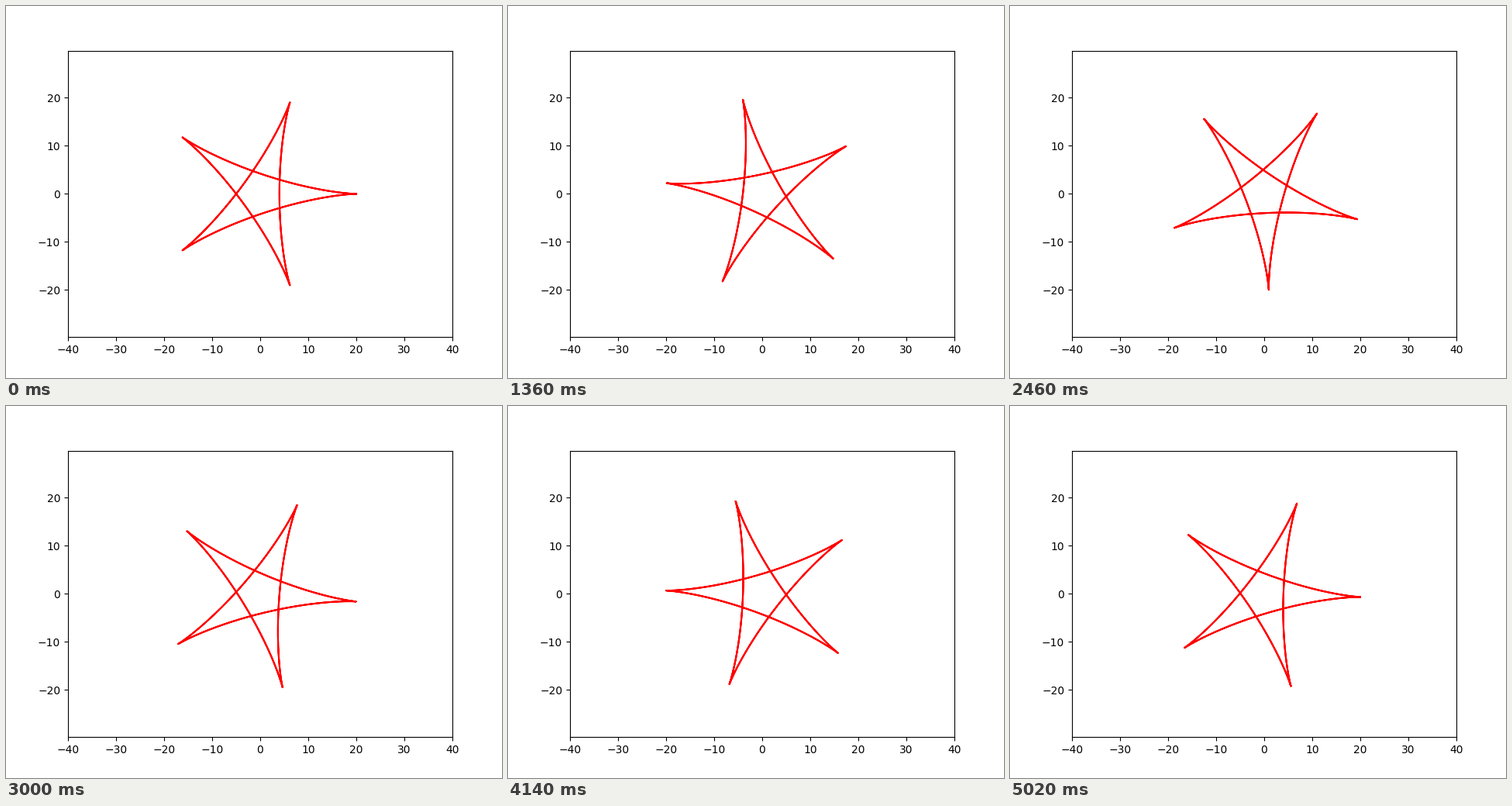
A matplotlib script that plays this animation: 640 by 480 pixels, repeating every 5040 ms.

```python
import numpy as np
import matplotlib.pyplot as plt
from matplotlib.animation import FuncAnimation

FRAMES = 252
INTERVAL = 20      # ms
STEP = 0.1         # radians turned per frame
R, r = 20, 8       # fixed and rolling circle

# Five-cusped hypocycloid, traced around twice
t = np.linspace(0, 8 * np.pi, 2001)
k = (R - r) / r
star = (R - r) * np.exp(1j * t) + r * np.exp(-1j * k * t)

fig, ax = plt.subplots(figsize=(6.4, 4.8), dpi=100)
half = 40
box = ax.get_position()
ratio = (box.height * 4.8) / (box.width * 6.4)
ax.set_xlim(-half, half)
ax.set_ylim(-half * ratio, half * ratio)   # equal units on both axes
line, = ax.plot([], [], color="red", lw=1.5)


def update(i):
    turned = star * np.exp(1j * STEP * i)
    line.set_data(turned.real, turned.imag)
    return line,


def init():
    return update(0)


anim = FuncAnimation(fig, update, frames=FRAMES, init_func=init,
                     interval=INTERVAL, repeat=True, repeat_delay=0, blit=True)
plt.show()
```
